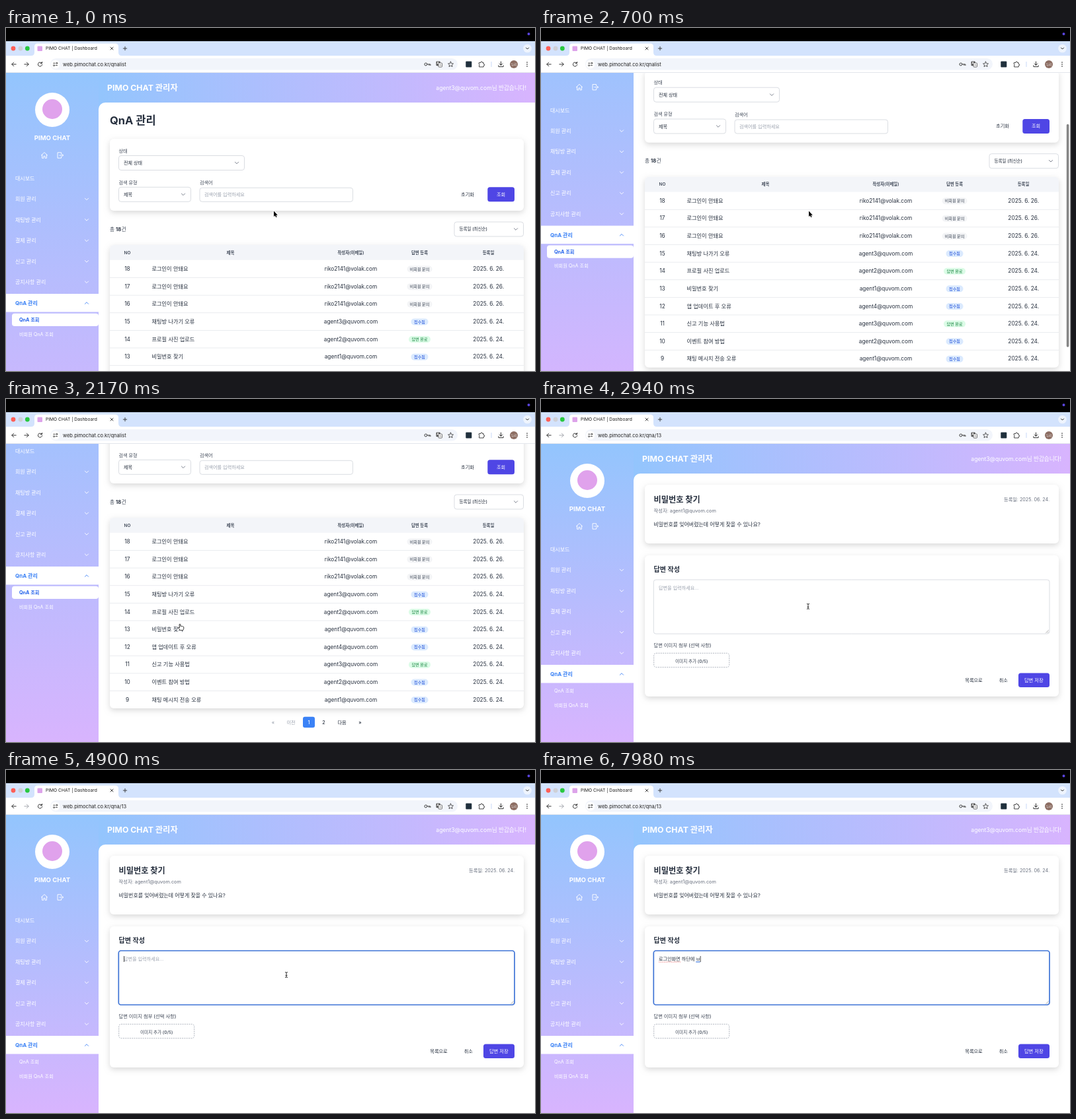
Write an HTML page with a canvas that moves like this. It is 800 px wide and 520 px high and loops after 8000 ms.

```html
<!DOCTYPE html>
<html lang="ko">
<head>
<meta charset="utf-8">
<title>QnA 관리</title>
<style>
html, body { margin: 0; width: 100%; height: 100%; overflow: hidden; background: #fff; }
canvas { display: block; width: 800px; height: 520px; }
</style>
</head>
<body>
<canvas id="stage"></canvas>
<script>
const W = 800, H = 520, TOP = 68, LOOP = 8000;
const NAV = 2310, FOCUS = 3570, TYPE = 5180;
const BRAND = 'PIMO CHAT', HOST = 'web.pimochat.co.kr';
const FONT = 'Inter, "Noto Sans CJK KR", "Noto Sans CJK", sans-serif';
const INK = '#27303f', MID = '#414a59', GRAY = '#6b7280', PALE = '#9ca3af', LINE = '#d1d5db';
const BLUE = '#3b82f6', INDIGO = '#4f46e5', SKY = '#93c5fd', LILAC = '#d8b4fe';

const canvas = document.getElementById('stage');
const c = canvas.getContext('2d');
const dpr = window.devicePixelRatio || 1;
canvas.width = W * dpr;
canvas.height = H * dpr;

const agent = n => `agent${n}@quvom.com`;
const guest = 'riko2141@volak.com';
const states = {
  guest: ['비회원 문의', 38, '#f3f4f6', '#374151'],
  open: ['접수됨', 26, '#dbeafe', '#1d4ed8'],
  done: ['답변 완료', 33, '#dcfce7', '#15803d']
};
const rows = [
  ['로그인이 안돼요', guest, 'guest'],
  ['로그인이 안돼요', guest, 'guest'],
  ['로그인이 안돼요', guest, 'guest'],
  ['채팅방 나가기 오류', agent(3), 'open'],
  ['프로필 사진 업로드', agent(2), 'done'],
  ['비밀번호 찾기', agent(1), 'open'],
  ['앱 업데이트 후 오류', agent(4), 'open'],
  ['신고 기능 사용법', agent(3), 'done'],
  ['이벤트 참여 방법', agent(2), 'open'],
  ['채팅 메시지 전송 오류', agent(1), 'open']
];

// Each entry: time of the key press and the text after it.
const keys = [
  [TYPE, 'ㄹ'], [5250, '로'], [5320, '록'], [5390, '로그'], [5460, '로긍'], [5530, '로그이'],
  [5670, '로그인'], [5810, '로그인ㅎ'], [5950, '로그인호'], [6050, '로그인화'],
  [6160, '로그인홤'], [6230, '로그인화며'], [6300, '로그인화면'], [6400, '로그인화면 '],
  [6440, '로그인화면 ㅎ'], [6580, '로그인화면 하'], [6650, '로그인화면 핟'], [6720, '로그인화면 하다'],
  [6860, '로그인화면 하단'], [7140, '로그인화면 하단ㅇ'], [7280, '로그인화면 하단에'],
  [7560, '로그인화면 하단에 '], [7980, '로그인화면 하단에 ㅂ']
];

const scrollPath = [[470, 0], [490, 5], [560, 38], [630, 74], [700, 103], [770, 124],
  [840, 140], [910, 150], [980, 152], [1050, 151], [1260, 149]];

const clamp = v => Math.max(0, Math.min(1, v));
const span = (t, a, b) => clamp((t - a) / (b - a));
const ease = p => p * p * (3 - 2 * p);
const mix = (a, b, p) => a + (b - a) * p;

function along(path, t) {
  if (t <= path[0][0]) return path[0][1];
  for (let i = 1; i < path.length; i++) {
    const [t0, v0] = path[i - 1], [t1, v1] = path[i];
    if (t <= t1) return mix(v0, v1, span(t, t0, t1));
  }
  return path[path.length - 1][1];
}

// y is the visual middle of the line.
function text(s, x, y, size, color, weight = 400, align = 'left') {
  c.font = `${weight} ${size}px ${FONT}`;
  c.textAlign = align;
  c.fillStyle = color;
  c.fillText(s, x, y + size * 0.36);
}

function box(x, y, w, h, r, fill, stroke, lw = 0.8) {
  c.beginPath();
  c.roundRect(x, y, w, h, r);
  if (fill) { c.fillStyle = fill; c.fill(); }
  if (stroke) { c.strokeStyle = stroke; c.lineWidth = lw; c.stroke(); }
}

function disc(x, y, r, fill) {
  c.beginPath();
  c.arc(x, y, r, 0, 7);
  c.fillStyle = fill;
  c.fill();
}

function icon(d, x, y, stroke, lw = 1, fill) {
  const p = new Path2D(d);
  c.save();
  c.translate(x, y);
  c.lineCap = c.lineJoin = 'round';
  if (fill) { c.fillStyle = fill; c.fill(p); }
  if (stroke) { c.strokeStyle = stroke; c.lineWidth = lw; c.stroke(p); }
  c.restore();
}

const chevron = (x, y, color, up) => icon(up ? 'M-2.6 1.3L0-1.3 2.6 1.3' : 'M-2.6-1.3L0 1.3 2.6-1.3', x, y, color, 0.9);

function gradient(x0, y0, x1, y1) {
  const g = c.createLinearGradient(x0, y0, x1, y1);
  g.addColorStop(0, SKY);
  g.addColorStop(1, LILAC);
  return g;
}

function card(x, y, w, h) {
  c.save();
  c.shadowColor = 'rgba(0,0,0,.15)';
  c.shadowBlur = 9 * dpr;
  c.shadowOffsetY = 3 * dpr;
  box(x, y, w, h, 6, '#fff');
  c.restore();
}

function select(label, x, y, w, size = 7.1) {
  box(x, y, w, 22, 3.5, '#fff', LINE);
  text(label, x + 7.5, y + 11, size, INK, 500);
  chevron(x + w - 11.5, y + 11, GRAY);
}

function browser(detail) {
  c.fillStyle = '#000'; c.fillRect(0, 0, W, 20);
  disc(790.5, 9, 2, '#5b45e0');
  c.fillStyle = '#d3e3fd'; c.fillRect(0, 20, W, 22);
  disc(11, 31, 3.4, '#ff5f57');
  disc(22, 31, 3.4, '#cfd0d6');
  disc(32.3, 31, 3.4, '#28c840');
  icon('M38 42Q43 42 43 37V28Q43 23.5 48 23.5H165Q170 23.5 170 28V37Q170 42 175 42Z', 0, 0, null, 1, '#fff');
  box(47.5, 27.5, 7.5, 7.5, 1, '#dda3ea');
  text(BRAND + ' | Dashboard', 60, 31, 6.7, '#1f1f1f');
  icon('M-2-2L2 2M2-2L-2 2', 160, 31, '#333', 0.9);
  icon('M-2.7 0H2.7M0-2.7V2.7', 180, 31, '#333', 0.9);
  disc(788.5, 31, 6.3, '#eef4fe');
  icon('M-2-1L0 1 2-1', 788.5, 31, '#222', 1);

  c.fillStyle = '#fff'; c.fillRect(0, 42, W, 26);
  c.fillStyle = '#e3e6ec'; c.fillRect(0, 67, W, 1);
  box(67, 46, 616, 17.5, 8.7, '#f2f5fb');
  const arrow = 'M3.2 0H-3.2M-0.3-2.9L-3.2 0-0.3 2.9';
  icon(arrow, 12, 55, '#333', 1);
  c.save(); c.translate(31, 55); c.scale(-1, 1);
  icon(arrow, 0, 0, detail ? '#a4a7ad' : '#333', 1);
  c.restore();
  icon('M2.4-1.9A3.1 3.1 0 1 0 3.1 0.5M3-3.6V-1.4H0.8', 51.5, 55, '#333', 1);
  disc(74.7, 55, 6.6, '#fff');
  icon('M-3-1.7H-0.6M2.9 1.7H0.5M3.1-1.7A1 1 0 1 1 1.1-1.7A1 1 0 1 1 3.1-1.7M-1.1 1.7A1 1 0 1 1-3.1 1.7A1 1 0 1 1-1.1 1.7', 74.7, 55, '#333', 0.9);
  text(HOST + (detail ? '/qna/13' : '/qnalist'), 86, 55, 7.5, '#222');

  icon('M-0.6 0A2 2 0 1 1-4.6 0A2 2 0 1 1-0.6 0H4.4V1.7M2.4 0V1.6', 637.5, 55, '#444', 1);
  box(650.5, 50.5, 6.2, 6.8, 1, '#555');
  box(654, 53, 5.5, 6.2, 1, '#fff', '#555', 0.8);
  text('A', 653.3, 53.7, 4.5, '#fff', 700, 'center');
  text('가', 656.8, 56.2, 3.8, '#444', 500, 'center');
  icon('M0-4L1.2-1.3 4-1 1.9 0.9 2.5 3.7 0 2.2-2.5 3.7-1.9 0.9-4-1-1.2-1.3Z', 672.5, 55, '#444', 0.9);
  box(695.3, 50.5, 9, 9, 1, '#20303c');
  icon('M-3.4-2.4H-1Q-1.2-4.2 0.2-4.2T1.4-2.4H3.2V-0.2Q4.8-0.3 4.8 0.9T3.2 2.1V4H-3.4V2Q-2-0-3.4-0.2Z', 719, 55, '#444', 1);
  c.fillStyle = '#c7daf8'; c.fillRect(733.5, 51, 1, 8);
  icon('M0-4V1.2M-2.4-1L0 1.4 2.4-1M-3.6 1.8V3.7H3.6V1.8', 748.5, 55, '#333', 1);
  disc(768, 55, 6, '#8d6e63');
  text('누리', 768, 55, 4.4, '#fff', 400, 'center');
  for (const dy of [-3, 0, 3]) disc(788, 55 + dy, 0.85, '#333');
}

function sidebar(detail, bottom) {
  c.fillStyle = gradient(0, TOP, 0, bottom);
  c.fillRect(0, TOP, 140, bottom - TOP);
  disc(70, 124, 26, '#fff');
  disc(70, 123, 15, '#e0a2ec');
  text(BRAND, 70, 167, 9.6, '#fff', 700, 'center');
  icon('M-4.6 0L0-4.4 4.6 0M-3.4-1V4.3H-1.1V1.3H1.1V4.3H3.4V-1', 58, 193, '#fff', 0.9);
  icon('M1.6-2V-4.2H-4V4.2H1.6V2M-1.2 0H4.6M2.8-1.8L4.6 0 2.8 1.8', 82, 193, '#fff', 0.9);
  const menu = ['대시보드', '회원 관리', '채팅방 관리', '결제 관리', '신고 관리', '공지사항 관리'];
  menu.forEach((label, i) => {
    const y = 228 + i * 31.45;
    text(label, 14, y, 8, '#fff', 500);
    if (i) chevron(122, y, '#fff');
  });
  c.fillStyle = '#fff'; c.fillRect(0, 403, 140, 27.5);
  text('QnA 관리', 14, 417, 8, BLUE, 700);
  chevron(122, 417, BLUE, true);
  if (!detail) box(9, 432.7, 131, 19.3, 4, '#fff');
  text('QnA 조회', 20, 442.5, 7.2, detail ? '#fff' : '#2563eb', detail ? 400 : 700);
  text('비회원 QnA 조회', 20, 464, 7.2, '#fff');
}

function header(bottom) {
  c.fillStyle = gradient(140, 0, W, 0);
  c.fillRect(140, TOP, W - 140, 60);
  text(BRAND + ' 관리자', 153, 90.5, 12.3, '#fff', 700);
  text(agent(3) + '님 반갑습니다!', 787, 90.5, 8.6, '#fff', 400, 'right');
  box(140, 113, W - 140, bottom - 113, [10, 0, 0, 0], '#fff');
}

function listPage() {
  text('QnA 관리', 157, 140, 16.5, INK, 700);
  card(157, 168, 626, 109);
  text('상태', 170.5, 186, 7.1, MID, 500);
  select('전체 상태', 170.5, 193.5, 190);
  text('검색 유형', 170.5, 234, 7.1, MID, 500);
  select('제목', 170.5, 241.3, 109);
  text('검색어', 293, 234.5, 7.1, MID, 500);
  box(293, 242.3, 231.5, 21, 3.5, '#fff', LINE);
  text('검색어를 입력하세요', 300, 252.8, 7.1, PALE);
  text('초기화', 698, 252.2, 7.2, INK, 500, 'center');
  box(728.3, 241.2, 40.7, 22, 3.5, INDIGO);
  text('조회', 748.6, 252.2, 7.2, '#fff', 500, 'center');

  text('총', 157, 305, 7.6, MID);
  text('18', 166, 305, 7.6, INK, 700);
  text('건', 174.8, 305, 7.6, MID);
  select('등록일 (최신순)', 678, 294, 104.5, 6.5);

  card(157, 329, 626, 289);
  box(157, 329, 626, 22.8, [6, 6, 0, 0], '#f3f5f9');
  const heads = [['NO', 183.5], ['제목', 339.5], ['작성자(이메일)', 521.5], ['답변 등록', 625.5], ['등록일', 729.5]];
  for (const [s, x] of heads) text(s, x, 340.4, 6.4, MID, 600, 'center');
  rows.forEach(([title, mail, state], i) => {
    const y = 365.1 + i * 26.63;
    c.fillStyle = '#e5e7eb';
    if (i < 9) c.fillRect(157, y + 13, 626, 0.8);
    text(18 - i, 183.5, y, 8.3, INK, 400, 'center');
    text(title, 220.5, y, 8.2, INK);
    text(mail, 521.5, y, 8.3, INK, 400, 'center');
    const [label, w, bg, fg] = states[state];
    box(625.5 - w / 2, y - 4.6, w, 10, 5, bg);
    text(label, 625.5, y + 0.4, 6.1, fg, 500, 'center');
    text(`2025. 6. ${i < 3 ? 26 : 24}.`, 729.7, y, 8.3, INK, 400, 'center');
  });

  box(449, 630.7, 18, 16.5, 3, BLUE);
  const pages = [['«', 404, PALE], ['이전', 431, PALE], ['1', 458, '#fff'], ['2', 480.5, INK], ['다음', 508, INK], ['»', 535.5, INK]];
  for (const [s, x, color] of pages) text(s, x, 639, 7.2, color, 500, 'center');
}

function answer(t) {
  const x = 178, y = 286.5, size = 7.1;
  let typed = '', last = FOCUS;
  for (const [at, s] of keys) if (t >= at) { typed = s; last = at; }
  if (typed) text(typed, x, y, size, INK);
  else text('답변을 입력하세요...', x, y, size, PALE);
  if (t < FOCUS) return;
  const width = s => c.measureText(s).width;
  const end = x + width(typed);
  if (typed.includes(' ')) {
    c.fillStyle = '#ef6a6a';
    const stop = x + width('로그인화면');
    for (let dx = x; dx < stop; dx += 1.6) c.fillRect(dx, 290.6, 0.9, 0.9);
  }
  if (typed && !typed.endsWith(' ')) {
    c.fillStyle = '#2f6fe0';
    const start = x + width(typed.slice(0, -1));
    c.fillRect(start, 290.4, end - start, 1.1);
  }
  if ((t - last) % 1000 < 500) {
    c.fillStyle = '#222';
    c.fillRect(end, 282, 0.8, 9);
  }
}

function detailPage(t) {
  card(157, 130, 626, 89);
  text('비밀번호 찾기', 170.5, 152.5, 12.2, INK, 700);
  text('등록일: 2025. 06. 24.', 769, 152.5, 7.2, GRAY, 400, 'right');
  text('작성자: ' + agent(1), 170.5, 169, 7.3, GRAY);
  text('비밀번호를 잊어버렸는데 어떻게 찾을 수 있나요?', 170.5, 190, 7.95, INK);

  card(157, 237, 626, 214);
  text('답변 작성', 170.5, 258, 10.1, INK, 700);
  const active = t >= FOCUS;
  box(170.3, 274, 598.7, 82, 3.5, '#fff', active ? '#3f74d6' : LINE, active ? 1.7 : 0.8);
  icon('M-4 0L0-4M-1.6 0L0-1.6', 767.5, 354.5, '#888', 0.6);
  answer(t);
  text('답변 이미지 첨부 (선택 사항)', 170.5, 373, 7.3, MID, 500);
  c.setLineDash([2, 1.3]);
  box(170.7, 385.3, 114, 21.4, 3.5, '#fff', PALE);
  c.setLineDash([]);
  text('이미지 추가 (0/5)', 227.7, 397.5, 6.6, MID, 500, 'center');
  text('목록으로', 654.5, 426.2, 7.2, INK, 500, 'center');
  text('취소', 699.3, 426.2, 7.2, INK, 500, 'center');
  box(722, 415.5, 47, 21.5, 3.5, INDIGO);
  text('답변 저장', 745.3, 426.2, 7.3, '#fff', 500, 'center');
}

function scrollbar(t, scroll) {
  const alpha = span(t, 470, 560) * (1 - span(t, 1780, 2050));
  if (!alpha || t >= NAV) return;
  const ratio = 452 / 601;
  c.globalAlpha = alpha;
  box(794.8, TOP + Math.min(scroll, 150) * ratio, 3.6, 338, 1.8, '#858585');
  c.globalAlpha = 1;
}

const ARROW = 'M0 0V8.4L1.9 6.7 3.2 9.6 4.6 9 3.3 6.2H5.8Z';
const HAND = 'M-0.8 0.6Q0-0.6 0.8 0.6V3.4Q2 2.6 2.9 3.6Q4 3 4.6 4.2Q5.8 3.8 5.8 5V7Q5.4 8.4 4.8 9.6H0.2Q-1 7.8-2.9 5.6Q-2.4 4.4-0.8 5.6Z';
const BEAM = 'M-1.6-4Q0-4 0-3Q0-4 1.6-4M0-3V3M-1.6 4Q0 4 0 3Q0 4 1.6 4M-1 0.9H1';

function pointer(t) {
  if (t >= TYPE) return;
  if (t >= NAV) {
    const p = ease(span(t, 2450, 3080));
    const x = mix(263, 424, p), y = mix(342, 310.5, p);
    icon(BEAM, x, y, '#fff', 1.8);
    icon(BEAM, x, y, '#222', 0.9);
    return;
  }
  const p = ease(span(t, 1330, 2100));
  const x = mix(405, 263, p), y = mix(277.5, 341, p);
  if (p > 0.02) {
    icon(HAND, x, y, '#111', 0.8, '#fff');
  } else {
    icon(ARROW, x, y, '#fff', 1.2);
    icon(ARROW, x, y, null, 1, '#000');
  }
}

function draw(t) {
  const detail = t >= NAV;
  const scroll = detail ? 0 : along(scrollPath, t);
  const bottom = detail ? H : 669;
  c.setTransform(dpr, 0, 0, dpr, 0, 0);
  c.fillStyle = '#fff';
  c.fillRect(0, 0, W, H);
  c.save();
  c.beginPath();
  c.rect(0, TOP, W, H - TOP);
  c.clip();
  c.translate(0, -scroll);
  header(bottom);
  sidebar(detail, bottom);
  if (detail) detailPage(t); else listPage();
  c.restore();
  scrollbar(t, scroll);
  browser(detail);
  pointer(t);
}

const begin = performance.now();
function tick() {
  draw((performance.now() - begin) % LOOP);
  requestAnimationFrame(tick);
}
tick();
</script>
</body>
</html>
```
